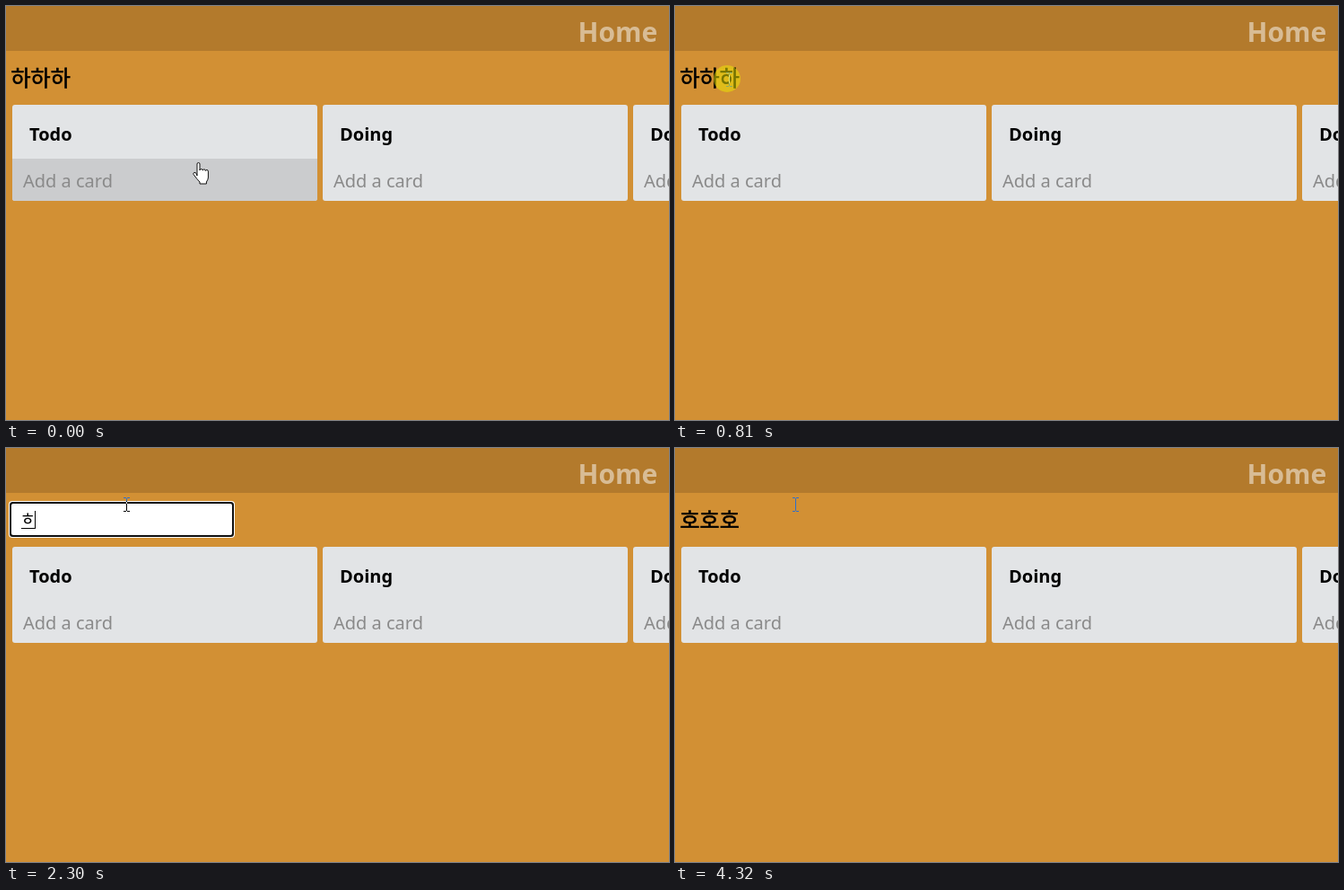
An HTML page with a canvas for the animation above (4.55 s loop, 739 px wide and 461 px high).

```html
<!DOCTYPE html>
<html lang="ko">
<head>
<meta charset="utf-8">
<style>
  html, body { margin: 0; width: 100%; height: 100%; overflow: hidden; background: #d29034; }
  canvas { display: block; }
</style>
</head>
<body>
<canvas id="stage" width="739" height="461"></canvas>
<script>
const ctx = document.getElementById('stage').getContext('2d');
const LOOP = 4550;
const LATIN = '"Noto Sans", "Open Sans", sans-serif';
const HANGUL = '"Noto Sans CJK KR", "Noto Sans CJK", "Noto Sans CJK JP", sans-serif';
const ADVANCE = 17.3;
const HAND = new Path2D('M5 15V2q0-1.5 1.5-1.5T8 2V9q0-1.5 1.6-1.5t1.6 1.6q.2-1.2 1.6-1.2t1.6 1.6q.2-1 1.5-1t1.5 1.6V17q0 2-2 5v2H8v-2Q5 19 1 13.5q-.6-1.6.8-2t2 .6z');
const ARROW = new Path2D('M.5.5V16l3.6-3.4 2.6 5.9 2.3-1-2.6-5.7h4.9z');

// Field states: [start, text, caret visible, last syllable composing]
const TYPING = [
  [970, '하하하', 1, 0], [1520, '하하하', 0, 0], [1670, '하하', 0, 0],
  [1840, '하', 0, 0], [1920, '', 0, 0], [2070, '', 1, 0],
  [2300, 'ㅎ', 1, 1], [2850, 'ㅎ', 0, 1], [2930, '호', 1, 1],
  [3080, '호ㅎ', 1, 1], [3160, '호호', 1, 1], [3620, '호호호', 1, 1],
  [4000, '호호호', 0, 0]
];
const CLOSE = 4090, SAVED = 4320;

const mix = (a, b, p) => a + (b - a) * p;
const clamp = (v, lo, hi) => Math.min(hi, Math.max(lo, v));
const smooth = p => p * p * (3 - 2 * p);

function rect(x, y, w, h, color, radius = 0) {
  ctx.fillStyle = color;
  ctx.beginPath();
  ctx.roundRect(x, y, w, h, radius);
  ctx.fill();
}

function text(str, x, y, font, color) {
  ctx.font = font;
  ctx.fillStyle = color;
  ctx.fillText(str, x, y);
}

function pointer(shape, x, y) {
  ctx.save();
  ctx.translate(x, y);
  ctx.lineWidth = 1;
  ctx.fillStyle = '#fff';
  ctx.strokeStyle = '#111';
  ctx.fill(shape);
  ctx.stroke(shape);
  ctx.restore();
}

// Text cursor inverts whatever lies below it
function ibeam(x, y) {
  ctx.globalCompositeOperation = 'difference';
  rect(x, y - 7, 1, 14, '#fff');
  for (const dy of [-8, 7]) {
    rect(x - 3, y + dy, 3, 1, '#fff');
    rect(x + 1, y + dy, 3, 1, '#fff');
  }
  ctx.globalCompositeOperation = 'source-over';
}

function drawBoard(hover) {
  rect(0, 0, 739, 461, '#d29034');
  rect(0, 0, 739, 50, '#b37a2c');
  text('Home', 637.5, 40, 'bold 30px ' + LATIN, '#d8bc95');
  ['Todo', 'Doing', 'Done'].forEach((name, i) => {
    const x = 7 + i * 346;
    rect(x, 110, 340, 107, '#e2e4e6', 3);
    if (hover && i === 0) rect(x, 170, 340, 47, '#cbccce', [0, 0, 3, 3]);
    text(name, x + 19, 150, 'bold 20px ' + LATIN, '#000');
    text('Add a card', x + 12, 202, '20px ' + LATIN, '#8a8a8a');
  });
}

function drawTitle(str) {
  text(str, 5.5, 89, '24px ' + HANGUL, '#000');
  ctx.strokeStyle = '#000';
  ctx.lineWidth = .6;
  ctx.strokeText(str, 5.5, 89);
}

function drawField(t) {
  const [, str, caret, composing] = TYPING.filter(s => s[0] <= t).pop();
  const n = str.length;
  const p = clamp((t - 1050) / 100, 0, 1);
  const shade = [231, 233, 233].map(v => Math.round(mix(v, 255, p)));
  rect(3, 59, 252, 41, '#fff', 4);
  rect(4, 60, 250, 39, '#101010', 3.5);
  rect(6, 62, 246, 35, `rgb(${shade})`, 2);
  text(str, 15.5, 85.5, `300 18.8px ${HANGUL}`, '#000');
  if (composing) rect(Math.round(16.5 + ADVANCE * (n - 1)), 89, 16, 1, '#000');
  if (caret) rect(Math.round(15 + ADVANCE * n), 70, 1, 20, '#000');
}

function drawCursor(t) {
  if (t < 70) {
    pointer(HAND, 208, 174);
  } else if (t < 630) {
    const p = smooth(clamp(Math.floor((t - 50) / 70), 0, 7) / 7);
    const curve = (a, b, c) => mix(mix(a, b, p), mix(b, c, p), p);
    pointer(ARROW, Math.round(curve(206, 165, 105)), Math.round(curve(147, 105, 83)));
  } else {
    const p = clamp(Math.floor((t - 970) / 76), 0, 3) / 3;
    ibeam(Math.round(mix(60, 134, p)), Math.round(mix(82, 63, p)));
  }
}

function drawClick() {
  ctx.fillStyle = 'rgba(235, 232, 0, .5)';
  ctx.beginPath();
  ctx.arc(58, 81, 15, 0, 7);
  ctx.fill();
}

function frame() {
  const t = performance.now() % LOOP;
  drawBoard(t < 70);
  if (t >= 970 && t < CLOSE) drawField(t);
  else drawTitle(t < SAVED ? '하하하' : '호호호');
  drawCursor(t);
  if (t >= 810 && t < 970) drawClick();
  requestAnimationFrame(frame);
}
frame();
</script>
</body>
</html>
```
